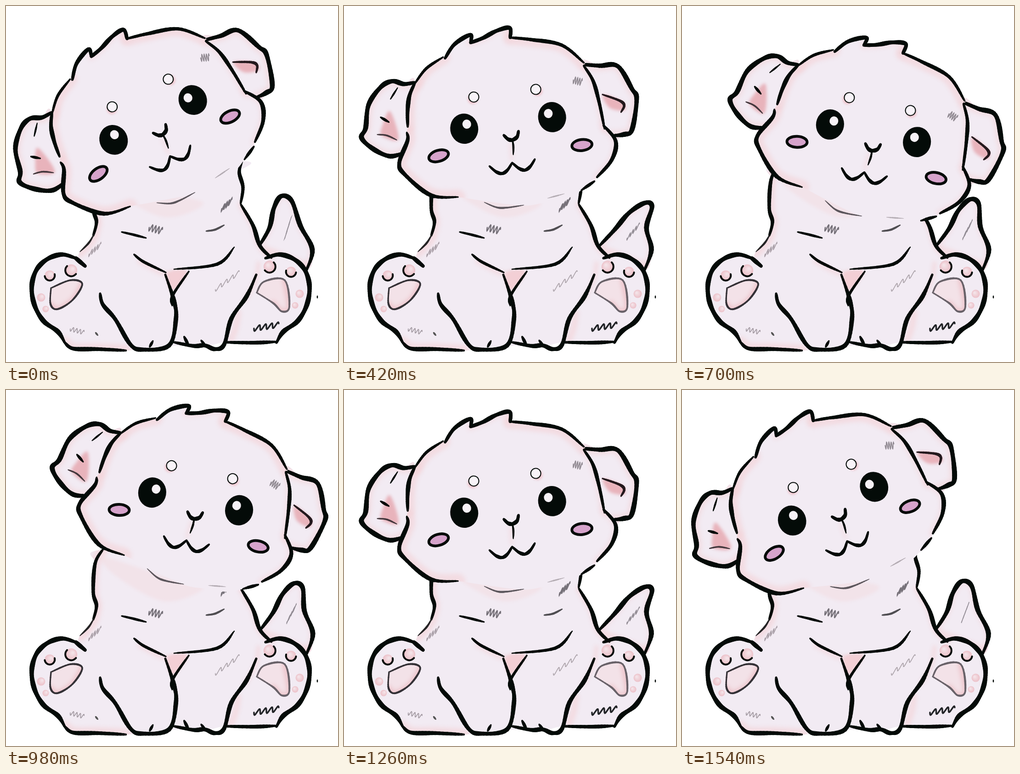
Animation, 723 px wide and 775 px high, one loop 1680 ms. Source, as an HTML page with a canvas:

```html
<!DOCTYPE html>
<html lang="en">
<head>
<meta charset="utf-8">
<title>Puppy</title>
<style>
  html, body { margin: 0; width: 100%; height: 100%; overflow: hidden; background: #fff; }
  canvas { display: block; }
</style>
</head>
<body>
<canvas id="stage" width="723" height="775"></canvas>
<script>
const ctx = document.getElementById('stage').getContext('2d');
const INK = '#040b08', FUR = '#f2ebf3', PINK = '#f4d3d8', ROSE = '#e5a0a8', GRAY = '#77727a';
const STEP_MS = 140, STEPS = 12;

// The head swings through these poses and back: eye midpoint, tilt, tail lean.
const POSES = [
  { x: 320.5, y: 248, tilt: -26.7, lean: 0 },
  { x: 329, y: 247.5, tilt: -22.3, lean: 10 },
  { x: 328.5, y: 261.5, tilt: -16, lean: 28 },
  { x: 357.5, y: 254.5, tilt: -7.5, lean: 57 },
  { x: 374.5, y: 251, tilt: 1.2, lean: 57 },
  { x: 417, y: 277, tilt: 11.4, lean: 28 },
  { x: 423, y: 272, tilt: 14.5, lean: 10 },
  { x: 413, y: 242.5, tilt: 11.5, lean: 28 }
];
const REST = POSES[4];
const poseAt = step => POSES[step < POSES.length ? step : STEPS - step];

const points = text => text.split(' ').map(pair => pair.split(',').map(Number));
const join = (...parts) => parts.join(' ');
const back = text => text.split(' ').reverse().join(' ');
const mirror = text => text.replace(/(\d+),/g, (_, x) => 717 - x + ',');

// Smooth curve through a few key points.
function curve(text, closed) {
  const p = points(text), n = p.length, out = [];
  const at = i => closed ? p[(i + n) % n] : p[Math.max(0, Math.min(n - 1, i))];
  for (let i = 0; i < (closed ? n : n - 1); i++) {
    const [a, b, c, d] = [at(i - 1), at(i), at(i + 1), at(i + 2)];
    for (let t = 0; t < 1; t += 0.125) {
      out.push([0, 1].map(k => b[k] + 0.5 * t * (c[k] - a[k] +
        t * (2 * a[k] - 5 * b[k] + 4 * c[k] - d[k] + t * (3 * (b[k] - c[k]) + d[k] - a[k])))));
    }
  }
  if (!closed) out.push(p[n - 1]);
  return out;
}

function shape(text) {
  const path = new Path2D();
  curve(text, true).forEach(([x, y]) => path.lineTo(x, y));
  path.closePath();
  return path;
}

function fill(text, color = FUR) {
  ctx.fillStyle = color;
  ctx.fill(shape(text));
}

// Brush line with narrowing ends and slightly uneven pressure.
function ink(text, width = 10, color = INK, tip = 0.5) {
  const pts = curve(text), n = pts.length - 1;
  ctx.strokeStyle = color;
  ctx.lineCap = 'round';
  for (let i = 0; i < n; i++) {
    const end = Math.min(1, Math.min(i + 0.5, n - i - 0.5) / Math.min(8, n / 2));
    ctx.lineWidth = width * (tip + (1 - tip) * end) * (1 + 0.09 * Math.sin(i * 0.7));
    ctx.beginPath();
    ctx.moveTo(...pts[i]);
    ctx.lineTo(...pts[i + 1]);
    ctx.stroke();
  }
}

function blurred(radius, alpha, paint) {
  ctx.save();
  ctx.filter = `blur(${radius}px)`;
  ctx.globalAlpha = alpha;
  paint();
  ctx.restore();
}

function soft(text, width, color = PINK, alpha = 0.6) {
  blurred(4, alpha, () => {
    ctx.strokeStyle = color;
    ctx.lineWidth = width;
    ctx.beginPath();
    curve(text).forEach(([x, y]) => ctx.lineTo(x, y));
    ctx.stroke();
  });
}

const softFill = (text, color, alpha = 0.8) => blurred(3, alpha, () => fill(text, color));

function inside(text, paint) {
  ctx.save();
  ctx.clip(shape(text));
  paint();
  ctx.restore();
}

function oval(x, y, rx, ry, color, line = 0, tilt = 0) {
  ctx.beginPath();
  ctx.ellipse(x, y, rx, ry, tilt * Math.PI / 180, 0, 7);
  ctx.fillStyle = color;
  ctx.fill();
  ctx.strokeStyle = INK;
  ctx.lineWidth = line;
  if (line) ctx.stroke();
}

// Slanted scribble from one point to another.
function scribble(x, y, dx, dy, height, width = 2, color = GRAY) {
  ctx.beginPath();
  for (let t = 0; t <= 1; t += 0.02) {
    const wave = Math.sin(t * Math.PI * 8) * height / 2;
    ctx.lineTo(x + dx * t - wave * 0.35, y + dy * t + wave);
  }
  ctx.strokeStyle = color;
  ctx.lineWidth = width;
  ctx.stroke();
}

function drawTail(lean) {
  const bend = (x, y) => {
    const sway = lean * ((560 - Math.min(y, 560)) / 147) ** 2;
    return `${x + sway},${y + sway * 0.26}`;
  };
  const outline = points('553,520 574,482 583,441 599,414 622,424 641,478 667,530 654,576')
    .map(p => bend(...p)).join(' ');
  const body = outline + ' 570,555';
  fill(body);
  inside(body, () => {
    soft('556,530 620,555 660,570', 22);
    soft(outline, 16, PINK, 0.4);
  });
  ink(outline);
  const [x, y] = points(bend(608, 503))[0];
  scribble(x, y, 12 + lean * 0.25, -40 + lean * 0.2, 12, 1.7, '#918b93');
}

function drawFoot(side) {
  ctx.save();
  // The right paw is the left one turned over.
  if (side > 0) {
    ctx.translate(716, -8);
    ctx.scale(-1, 1);
  }
  [77, 130, 187, 216].forEach((deg, i) => {
    const a = -deg * Math.PI / 180, r = 13 - 2 * i;
    const x = 130 + 54 * Math.cos(a), y = 628 + 54 * Math.sin(a);
    const tint = ctx.createRadialGradient(x + r * 0.3, y - r * 0.3, 1, x, y, r);
    tint.addColorStop(0, '#f4e4e9');
    tint.addColorStop(1, '#ecc0c8');
    oval(x, y, r, r, tint);
    ctx.beginPath();
    ctx.arc(x, y, r, a - 1, a + 2, true);
    ctx.strokeStyle = INK;
    ctx.lineWidth = 4;
    if (i < 2) ctx.stroke();
  });
  ctx.restore();

  const pad = side < 0
    ? '98,614 140,597 166,605 145,640 112,660 97,649'
    : '546,624 562,600 607,597 617,655 601,665 582,647';
  fill(pad, '#f3e2e8');
  inside(pad, () => soft(join(back(pad).split(' ').slice(0, 4).join(' ')), 12, ROSE, 0.4));
  ink(join(pad, pad.split(' ')[0]), 4, side < 0 ? '#343136' : '#696269', 0.7);
}

function drawBody() {
  const neck = '211,347 194,378 190,440 197,470 190,500';
  const shoulder = '191,498 180,516 161,535';
  const foot = '152,549 122,541 90,551 66,575 56,611 62,651 82,686 113,709 128,733';
  const seat = '128,733 147,746 200,747 261,750';
  const leftArm = '205,626 211,650 238,682 271,737 298,748 355,739 370,682 366,642 347,585';
  const rightArm = '366,732 408,740 433,739 455,747 475,737 491,680 524,632 545,585';
  const rump = '478,732 540,733 588,731';
  const nape = '514,337 508,362 516,395 511,430';
  const side = '512,433 538,478 553,522 578,548';
  const body = join(neck, shoulder, foot, seat, '298,746 355,740 433,740', rump,
    back(mirror(foot)), back(side), back(nape));

  fill(body);
  inside(body, () => {
    soft(join(neck, shoulder), 24);
    soft(side, 14);
    soft(seat, 26);
    soft('505,668 500,700 490,726', 14);
    soft('520,640 543,600 550,560', 9);
    soft('290,556 335,580 350,582', 9);
    softFill('215,365 350,408 430,430 345,460 240,405', PINK, 0.35);
  });
  softFill('352,580 396,578 362,622', '#f3c8ce');

  ink(neck, 8);
  ink(shoulder, 5, '#262526', 0.3);
  ink(nape, 8);
  ink(side, 9);
  ink(foot);
  ink('152,549 172,566', 9, INK, 0.9);
  ink(mirror(foot));
  ink(seat, 9);
  ink(rump, 9);
  ink(leftArm, 9);
  ink(rightArm, 9);
  ink('398,578 363,630 362,652', 7);
  ink('313,742 320,729', 6);
  ink('388,720 398,740', 7);
  ink('425,728 435,741', 6);

  ink('279,541 300,557 348,580', 7);
  ink('366,573 460,562 497,525', 8, INK, 0.3);
  ink('252,492 278,498 305,505', 6);
  ink('436,490 455,487 475,477', 5, '#504e52');

  scribble(312, 482, 28, 8, 14, 2.5);
  scribble(470, 441, 21, -17, 14, 2.5);
  scribble(181, 540, 25, -20, 13, 1.8, '#aaa0a8');
  scribble(456, 617, 52, -37, 12, 1.7, '#aaa1a8');
  scribble(540, 702, 54, -8, 12, 3.5, '#222427');
  scribble(140, 703, 30, 8, 9, 1.8, '#a39aa2');
  ink('195,711 200,717', 4, '#555');
  ink('678,631 678,636', 2.5);
  [-1, 1].forEach(drawFoot);
}

function drawEar(outline, cup) {
  fill(outline);
  inside(outline, () => {
    soft(outline, 24, PINK, 0.5);
    softFill(cup, ROSE, 0.75);
  });
  ink(outline);
}

function drawEars() {
  drawEar('187,133 163,133 139,123 112,132 80,166 66,215 54,235 76,263 110,284 146,279',
    '103,215 124,187 133,250 98,237');
  ink('129,161 148,139', 4);
  ink('102,197 118,210', 6);
  ink('89,233 109,238 129,251', 4, '#44383d');

  drawEar('551,149 590,158 629,165 652,218 659,242 639,306 620,314 586,312',
    '588,222 627,243 629,262 598,252');
  ink('587,221 622,240 630,252 621,265', 6, '#24191d');
}

function drawFace() {
  for (const side of [-1, 1]) {
    const brow = 377 + side * 68, eye = REST.x + side * 96.5;
    blurred(2, 0.8, () => oval(brow + side * 3, 190 + side * 2, 11, 11, '#eebcc4'));
    oval(brow, 186 + side * 2, 11, 11, '#f8f3f8', 2);
    oval(eye, REST.y + side * 2, 30.5, 33, INK);
    oval(eye - side * 7, 242 + side * 2, 9.5, 10, '#f6f1f6');
    oval(370 + side * 156, 311 + side * 12, 22, 12, '#d6a3cb', 6, side * 5 - 3);

    const smile = [0, 0.25, 0.5, 0.75, 1]
      .map(t => `${370 + side * 50 * t},${338 + 20 * Math.sin(t * Math.PI)}`);
    ink(smile.join(' '), 7);
  }
  soft('372,298 370,330', 6);
  ink('361,276 369,286 378,289 389,284 394,272', 8, INK, 0.6);
  ink('378,288 378,303 375,321', 5, INK, 0.4);
}

function drawHead() {
  const hair = '187,135 216,107 256,88';
  const frontTuft = '260,91 285,64 322,49 320,66';
  const topTuft = '320,66 348,60 380,49 409,47 407,68';
  const crown = '407,68 450,79 515,101 557,146';
  const rightTemple = '556,153 571,188 577,235 580,295';
  const rightCheek = '579,288 600,326 585,365 548,397';
  const rightJaw = '541,405 510,420';
  const chin = '480,432 430,434 380,434 297,411';
  const leftTemple = '187,134 171,160 162,192 157,226';
  const leftCheek = '153,238 152,256 127,301 135,328 184,381 242,394';
  const head = join(hair, frontTuft, topTuft, crown, rightTemple, rightCheek, rightJaw, chin,
    back(leftCheek), back(leftTemple));

  drawEars();
  fill(head);
  inside(head, () => {
    [hair, crown, leftTemple, leftCheek].forEach(edge => soft(edge, 32));
    [topTuft, rightTemple, rightCheek].forEach(edge => soft(edge, 18, PINK, 0.4));
  });
  ink(hair, 7);
  ink(frontTuft, 9, INK, 0.6);
  ink(topTuft, 9, INK, 0.7);
  ink(crown, 8);
  ink(leftTemple, 9);
  ink(leftCheek, 9, INK, 0.3);
  ink(rightTemple, 8);
  ink(rightCheek, 9);
  ink(rightJaw, 7);
  ink('297,414 322,429 345,433 381,433', 4, '#5c565c', 0.3);
  ink('435,426 472,422', 3, '#b4acb3', 0.3);
  scribble(529, 180, 18, 8, 14, 2, '#928b93');
  drawFace();
}

function draw({ x, y, tilt, lean }) {
  ctx.fillStyle = '#fff';
  ctx.fillRect(0, 0, 723, 775);
  drawTail(lean);
  drawBody();
  ctx.save();
  ctx.translate(x, y);
  ctx.rotate((tilt - REST.tilt) * Math.PI / 180);
  ctx.translate(-REST.x, -REST.y);
  drawHead();
  ctx.restore();
}

const start = performance.now();
let shown = -1;
function tick() {
  const step = Math.floor((performance.now() - start) / STEP_MS) % STEPS;
  if (step !== shown) draw(poseAt(shown = step));
  requestAnimationFrame(tick);
}
tick();
</script>
</body>
</html>
```
